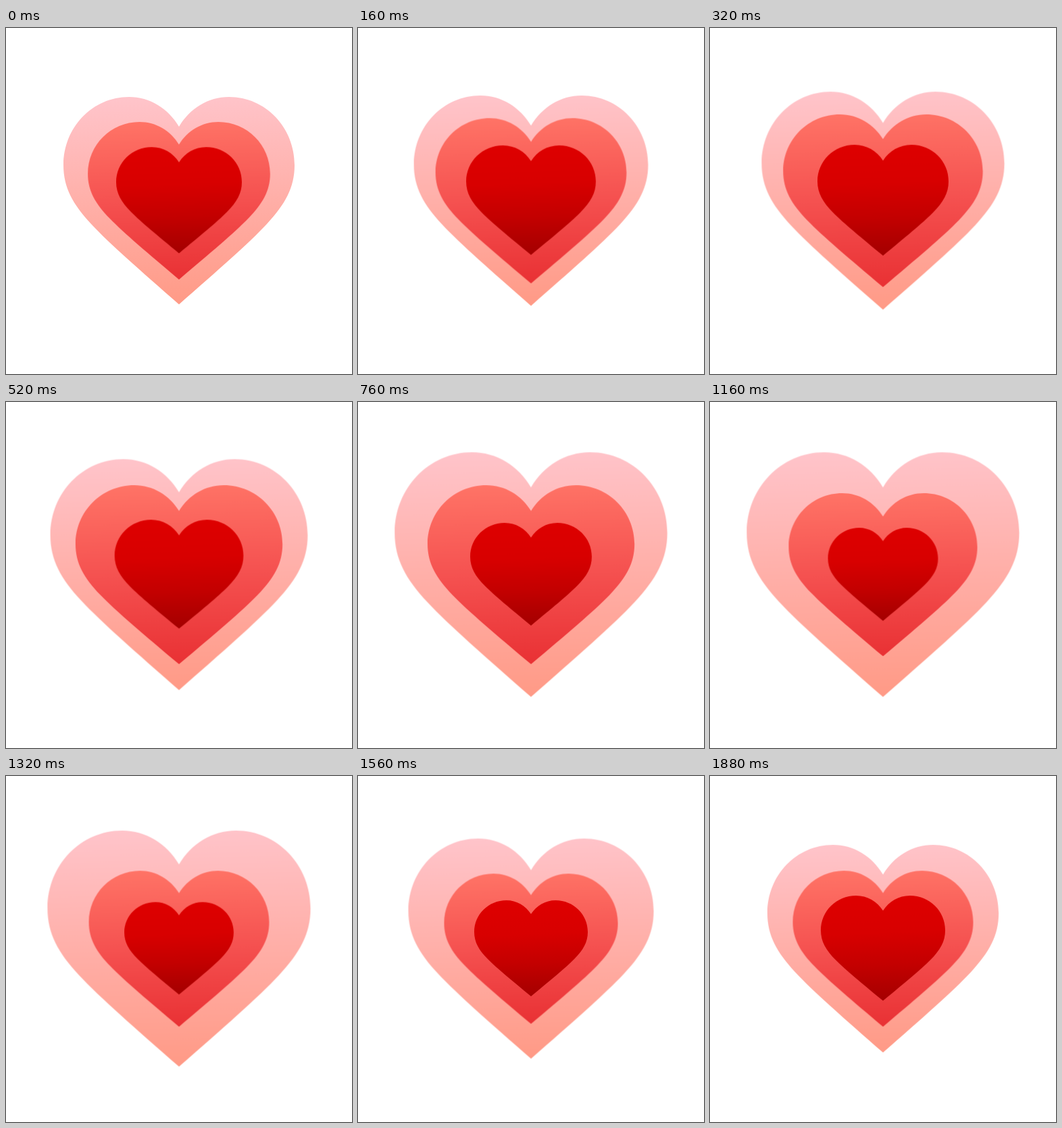
An HTML page that plays this animation: 512x512 px, repeating every 1920 ms.

```html
<!DOCTYPE html>
<html lang="en">
<head>
<meta charset="utf-8">
<title>Growing heart</title>
<style>
  html, body { margin: 0; width: 100%; height: 100%; overflow: hidden; background: #fff; }
  svg { display: block; width: 100vw; height: 100vh; }
  /* sine easing both ways: one full cosine wave per loop */
  .beat { animation: beat 960ms cubic-bezier(.3642, 0, .6358, 1) infinite alternate; }
  .outer { animation-delay: -1920ms; }
  .middle { animation-delay: -2240ms; }
  .inner { animation-delay: -2560ms; }
  @keyframes beat {
    from { transform: scale(1); }
    to { transform: scale(1.2); }
  }
</style>
</head>
<body>
<svg viewBox="-256 -256 512 512">
  <defs>
    <linearGradient id="pink" x1=".48" y1="0" x2=".52" y2="1">
      <stop offset="0" stop-color="#ffc4ca"/>
      <stop offset=".5" stop-color="#ffafa8"/>
      <stop offset="1" stop-color="#ff9a86"/>
    </linearGradient>
    <linearGradient id="coral" x1=".48" y1="0" x2=".52" y2="1">
      <stop offset="0" stop-color="#ff7366"/>
      <stop offset=".5" stop-color="#f55150"/>
      <stop offset="1" stop-color="#e93134"/>
    </linearGradient>
    <linearGradient id="red" x1=".48" y1="0" x2=".52" y2="1">
      <stop offset="0" stop-color="#de0000"/>
      <stop offset=".35" stop-color="#d80000"/>
      <stop offset=".65" stop-color="#c40000"/>
      <stop offset="1" stop-color="#a40000"/>
    </linearGradient>
    <path id="heart" d="M0-110
      C-16-137-43-154-74-154 C-128-154-171-109-171-53
      C-171-20-157 5-130 34 C-103 63-58 102 0 153
      C58 102 103 63 130 34 C157 5 171-20 171-53
      C171-109 128-154 74-154 C43-154 16-137 0-110Z"/>
  </defs>
  <g class="beat outer"><use href="#heart" fill="url(#pink)"/></g>
  <g class="beat middle"><use href="#heart" fill="url(#coral)" transform="scale(.751 .7235)"/></g>
  <g class="beat inner"><use href="#heart" fill="url(#red)" transform="translate(0 -.8) scale(.4727 .445)"/></g>
</svg>
</body>
</html>
```
